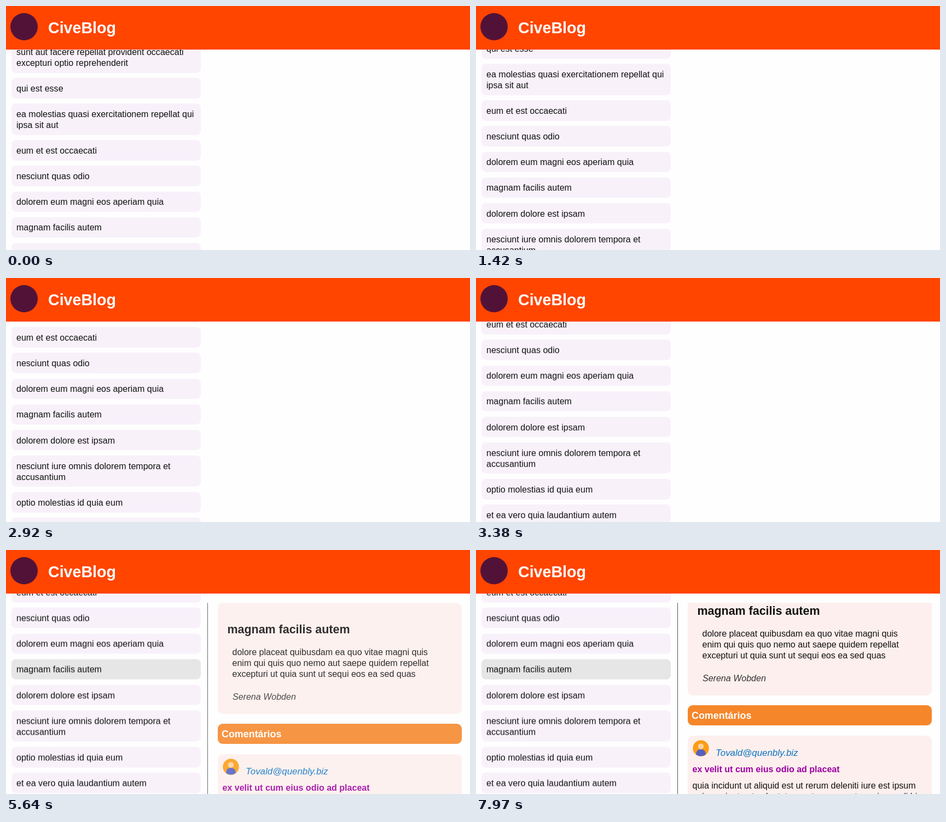
These frames come from a looping animation (848x448 px, 8000 ms). An HTML page:

```html
<!DOCTYPE html>
<html lang="pt">
<head>
<meta charset="utf-8">
<title>CiveBlog</title>
<style>
  html, body { margin: 0; width: 100%; height: 100%; overflow: hidden; background: #fefefe; }
  body { position: relative; font: 16.05px/20px "Liberation Sans", Arial, sans-serif; color: #111; }
  body * { box-sizing: border-box; }

  header { position: absolute; inset: 0 0 auto; height: 80px; background: #ff4500; z-index: 2; }
  header i { position: absolute; left: 8px; top: 13px; width: 50px; height: 50px; border-radius: 50%; background: #521238; }
  header b { position: absolute; left: 77px; top: 24px; font-size: 28.6px; line-height: 32px; color: #fff; }

  ul { position: absolute; left: 10px; top: 65.1px; width: 346px; margin: 0; padding: 0; list-style: none;
       animation: list 8s linear infinite; }
  li { margin-bottom: 9.5px; padding: 8.8px 9px; border-radius: 8px; background: #f8f1fa; white-space: nowrap; }
  li.picked { animation: pick 8s linear infinite; }

  .detail { position: absolute; left: 368px; top: 97px; width: 480px; height: 351px; overflow: hidden;
            border-left: 1px solid #55555c; animation: fade 8s linear infinite; }
  .page { position: absolute; left: -369px; top: -97px; width: 848px; height: 640px; animation: load 8s linear infinite, read 8s linear infinite; }
  .page > * { position: absolute; margin: 0; white-space: nowrap; }
  .card { left: 387px; width: 446px; border-radius: 9px; background: #fdefed; }
  h2 { left: 404.5px; top: 134px; font-size: 21.45px; line-height: 24px; }
  h3 { left: 387px; top: 319px; width: 446px; height: 37px; padding-left: 7px; border-radius: 9px;
       background: #f5862a; color: #fff; font-size: 17.9px; line-height: 38px; }
  .text { left: 413.5px; top: 177px; }
  .author { left: 414px; top: 259px; font-style: italic; color: #333; }
  svg { left: 396px; top: 383px; }
  .mail { left: 438px; top: 397px; font-size: 16.9px; font-style: italic; color: #0873c4; }
  .subject { left: 395.5px; top: 426px; font-weight: bold; color: #9c00a4; }
  .reply { left: 395.5px; top: 456px; }

  @keyframes list {
    0% { transform: translateY(0); }
    17.75% { transform: translateY(-73px); }
    29.5% { transform: translateY(-121px); }
    36.5% { transform: translateY(-156px); }
    44%, 100% { transform: translateY(-187.5px); }
  }
  @keyframes pick {
    0%, 56.24% { background: #f8f1fa; }
    56.25% { background: #ebebeb; }
    66%, 100% { background: #e6e6e6; }
  }
  @keyframes fade {
    0%, 56.24% { opacity: 0; }
    56.25% { opacity: .35; animation-timing-function: ease-out; }
    79%, 100% { opacity: 1; }
  }
  @keyframes load {
    0%, 57.9% { opacity: 0; }
    58%, 100% { opacity: 1; }
  }
  @keyframes read {
    0%, 85.5% { transform: translateY(0); }
    99.6%, 100% { transform: translateY(-34px); }
  }
</style>
</head>
<body>
  <header><i></i><b>CiveBlog</b></header>

  <ul>
    <li>sunt aut facere repellat provident occaecati<br>excepturi optio reprehenderit</li>
    <li>qui est esse</li>
    <li>ea molestias quasi exercitationem repellat qui<br>ipsa sit aut</li>
    <li>eum et est occaecati</li>
    <li>nesciunt quas odio</li>
    <li>dolorem eum magni eos aperiam quia</li>
    <li class="picked">magnam facilis autem</li>
    <li>dolorem dolore est ipsam</li>
    <li>nesciunt iure omnis dolorem tempora et<br>accusantium</li>
    <li>optio molestias id quia eum</li>
    <li>et ea vero quia laudantium autem</li>
    <li>in quibusdam tempore odit est dolorem</li>
  </ul>

  <div class="detail">
    <div class="page">
      <div class="card" style="top:97px;height:204px"></div>
      <h2>magnam facilis autem</h2>
      <p class="text">dolore placeat quibusdam ea quo vitae magni quis<br>enim qui quis quo nemo aut saepe quidem repellat<br>excepturi ut quia sunt ut sequi eos ea sed quas</p>
      <p class="author">Serena Wobden</p>
      <h3>Comentários</h3>
      <div class="card" style="top:374.5px;height:180px"></div>
      <svg width="30" height="30" viewBox="0 0 30 30">
        <circle cx="15" cy="15" r="14.7" fill="#fb9d14"/>
        <path d="M6 26.5Q6 17 15 17T24 26.5A14.7 14.7 0 0 1 6 26.5" fill="#5560c0"/>
        <circle cx="15" cy="11.5" r="5.2" fill="#ffd0a0"/>
      </svg>
      <p class="mail">Tovald@quenbly.biz</p>
      <p class="subject">ex velit ut cum eius odio ad placeat</p>
      <p class="reply">quia incidunt ut aliquid est ut rerum deleniti iure est ipsum<br>quia sapiente et voluptatem aut consequatur enim modi hic</p>
    </div>
  </div>
</body>
</html>
```
